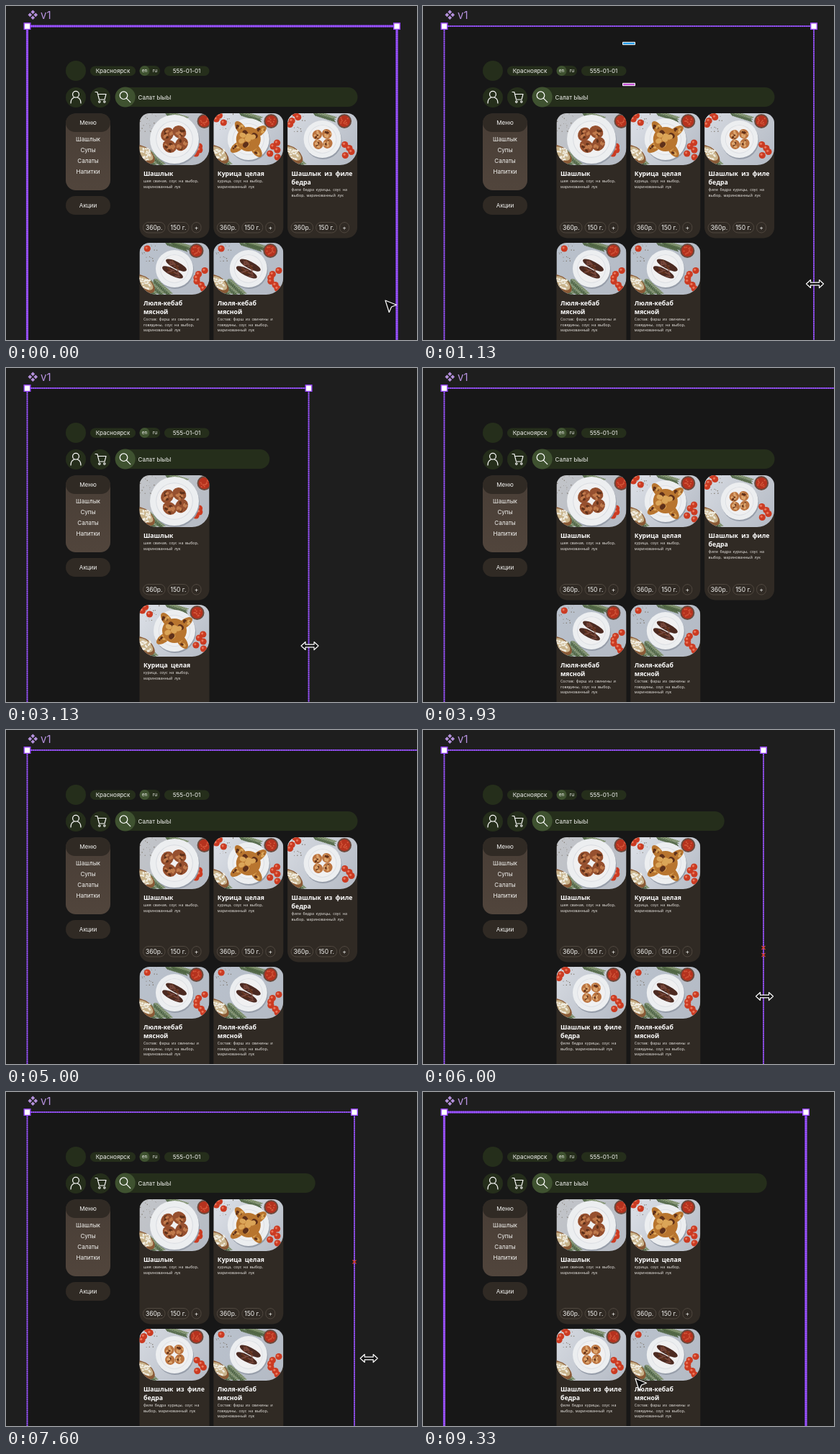
An HTML page with a canvas that plays this animation: 571x464 px, repeating every 9.6 s.

```html
<!DOCTYPE html>
<html lang="ru">
<head>
<meta charset="utf-8">
<title>Responsive menu</title>
<style>
  html, body { margin: 0; height: 100%; overflow: hidden; background: #1e1e1e; }
  canvas { display: block; width: 571px; height: 464px; }
</style>
</head>
<body>
<canvas id="stage"></canvas>
<script>
const W = 571, H = 464, LOOP = 9600, STEP = 1000 / 15;
const canvas = document.getElementById('stage');
const dpr = window.devicePixelRatio || 1;
canvas.width = W * dpr;
canvas.height = H * dpr;
const c = canvas.getContext('2d');

const UI = 'Inter, sans-serif', BODY = '"Noto Sans", sans-serif';
const GREEN = '#252e1b', LIME = '#3f5230', BROWN = '#302a24', PURPLE = '#9747ff';
const LEFT = 29.5, TOP = 28, FULL = 543, STICKY = 484;

// Each drag of the right edge: start, end, x it reaches
const DRAGS = [[1400, 2200, 463], [2400, 3330, 415], [3400, 4130, 640], [5000, 6000, 473],
  [6000, 6330, 442], [6470, 6730, 430], [6870, 8000, 532]];

const mix = (a, b, u) => a + (b - a) * u;
function ease(t, start, end) {
  const u = Math.min(1, Math.max(0, (t - start) / (end - start)));
  return u * u * (3 - 2 * u);
}
const dragX = t => DRAGS.reduce((x, [start, end, to]) => mix(x, to, ease(t, start, end)), FULL);

let seed = 1;
const rand = (a = 0, b = 1) => mix(a, b, (seed = seed * 16807 % 2147483647) / 2147483647);
const repeat = (n, draw) => { for (let i = 0; i < n; i++) draw(i); };

function box(x, y, w, h, r, fill, stroke, width = 1) {
  c.beginPath();
  c.roundRect(x, y, w, h, r);
  if (fill) { c.fillStyle = fill; c.fill(); }
  if (stroke) { c.strokeStyle = stroke; c.lineWidth = width; c.stroke(); }
}

function oval(x, y, rx, ry, fill, turn = 0) {
  c.beginPath();
  c.ellipse(x, y, rx, ry, turn, 0, 7);
  c.fillStyle = fill;
  c.fill();
}
const disc = (x, y, r, fill) => oval(x, y, r, r, fill);

function line(d, stroke, width, fill) {
  const p = new Path2D(d);
  if (fill) { c.fillStyle = fill; c.fill(p); }
  c.strokeStyle = stroke;
  c.lineWidth = width;
  c.stroke(p);
}

function text(s, x, y, size, { font = UI, weight = 400, color = '#f4f4f2', align = 'left', gap = 0 } = {}) {
  c.font = `${weight} ${size}px ${font}`;
  c.fillStyle = color;
  c.textAlign = align;
  c.wordSpacing = gap + 'px';
  c.fillText(s, x, y);
}
const centered = (s, x, y, size = 8.1) => text(s, x, y, size, { align: 'center' });

// Pieces sit on a ring: `along` and `across` are their radii, `core` fills the middle
const DISHES = {
  skewer: { plate: 34, bowl: 90, left: 0, right: 3, herbs: 3, light: '#c3c5c9',
    count: 4, ring: 12, along: 10, across: 8.5, start: .6, core: 0, meat: '#96502f', glaze: '#c07a4c' },
  chicken: { plate: 29, bowl: 80, left: 3, right: 5, herbs: 2, light: '#dde1e8',
    count: 4, ring: 18, along: 6, across: 12, start: .95, core: 17, meat: '#b8752f', glaze: '#dba558' },
  fillet: { plate: 26, bowl: 79, left: 4, right: 4, herbs: 2, light: '#d6dae1',
    count: 4, ring: 9.5, along: 7, across: 6.5, start: .7, core: 0, meat: '#bb7440', glaze: '#dda770' },
  kebab: { plate: 26, bowl: 79, left: 1, right: 6, herbs: 5, light: '#bac2cd',
    count: 2, ring: 5.5, along: 16, across: 5, start: -1.1, core: 0, meat: '#4b2a21', glaze: '#75463a' }
};

function herb(x, y, turn) {
  c.save();
  c.translate(x, y);
  c.rotate(turn);
  line('M-15 0H15', '#526b42', 1);
  for (let i = -14; i < 15; i += 2.5) {
    oval(i, -2, 3.2, .8, '#7b8d68', -.6);
    oval(i, 2, 3.2, .8, '#4d6340', .6);
  }
  c.restore();
}

function tomatoes(n, x, y) {
  repeat(n, i => {
    const tx = x + rand(-7, 7), ty = y + (i - (n - 1) / 2) * 5;
    disc(tx, ty, 4.6, '#cb3b22');
    disc(tx - 1.2, ty - 1.2, 1.6, '#ea765a');
  });
}

function bread(x, y) {
  oval(x, y, 17, 9, '#8a5a36', .7);
  oval(x + 1, y - 1, 13, 6.5, '#c9b48c', .7);
  repeat(30, () => disc(x + rand(-8, 8), y + rand(-8, 8), 1.3, '#f0ece0'));
}

function piece(x, y, along, across, turn, { meat, glaze }) {
  c.save();
  c.translate(x, y);
  c.rotate(turn);
  oval(0, 0, along, across, meat);
  repeat(9, i => oval(rand(-.6, .6) * along, rand(-.6, .6) * across,
    along * .26, across * .2, i % 3 ? glaze : '#5f3019', rand(-1, 1)));
  c.restore();
}

function photo(dish) {
  seed = dish.plate * 977 + dish.bowl;
  const x = 48.5, y = 36;
  c.save();
  c.beginPath();
  c.roundRect(0, 0, 97, 72, [14, 14, 24, 24]);
  c.clip();
  const g = c.createLinearGradient(0, 0, 97, 72);
  g.addColorStop(0, dish.light);
  g.addColorStop(1, '#b4bac4');
  c.fillStyle = g;
  c.fillRect(0, 0, 97, 72);

  repeat(dish.herbs, i => i % 2 ? herb(48 + i * 4, 4, .3) : herb(12 + i * 5, 62, .75));
  bread(7, 57);
  repeat(25, () => disc(rand(0, 30), rand(0, 26), rand(.3, .8), '#7d756b'));
  tomatoes(dish.left, 9, 8);
  tomatoes(dish.right, 85, 51);
  disc(dish.bowl, 11, 10, '#6b4a3e');
  disc(dish.bowl, 11, 8, '#b5321e');
  repeat(12, () => disc(dish.bowl + rand(-5, 5), 11 + rand(-5, 5), 1, '#d3573a'));

  disc(x + 1, y + 2, dish.plate, '#979eaa');
  disc(x, y, dish.plate, '#eceef0');
  disc(x, y, dish.plate * .76, '#d9dce1');
  disc(x, y, dish.plate * .73, '#f0f0f1');
  repeat(dish.count, i => {
    const a = dish.start + i / dish.count * 2 * Math.PI;
    piece(x + dish.ring * Math.cos(a), y + dish.ring * Math.sin(a),
      dish.along, dish.across, a + Math.PI / 2, dish);
  });
  if (dish.core) piece(x, y, dish.core, dish.core, 0, dish);
  c.restore();
}

const KEBAB = ['kebab', ['Люля-кебаб', 'мясной'],
  ['Состав: фарш из свинины и', 'говядины, соус на выбор,', 'маринованный лук']];
const CARDS = [
  ['skewer', ['Шашлык'], ['шея свиная, соус на выбор,', 'маринованный лук']],
  ['chicken', ['Курица целая'], ['курица, соус на выбор,', 'маринованный лук']],
  ['fillet', ['Шашлык из филе', 'бедра'], ['филе бедра курицы, соус на', 'выбор, маринованный лук']],
  KEBAB, KEBAB
];

function card([dish, title, info], x, y) {
  c.save();
  c.translate(x, y);
  box(0, 0, 97, 173.5, 15, BROWN);
  photo(DISHES[dish]);
  title.forEach((s, i) => text(s, 5.5, 86.7 + i * 12, 8.7, { font: BODY, weight: 700, gap: 1.9, color: '#fff' }));
  const infoY = 84.2 + title.length * 12;
  info.forEach((s, i) => text(s, 5.5, infoY + i * 7.5, 5.3, { font: BODY, gap: 1.2, color: '#e2dfdb' }));
  [['360р.', 5, 30.5], ['150 г.', 39.5, 29], ['+', 72.5, 13]].forEach(([s, px, w]) => {
    box(px, 151.5, w, 14.5, 7, null, '#574f46', .8);
    centered(s, px + w / 2, 161.8, 8.5);
  });
  c.restore();
}

function header(right) {
  disc(97, 90, 14, GREEN);
  box(117, 83.5, 63, 13.5, 7, GREEN);
  centered('Красноярск', 148.5, 93.2);
  box(185.5, 83, 28.5, 14, 7, GREEN);
  disc(192.5, 90, 7, LIME);
  centered('en', 192.5, 92.4, 6.6);
  centered('ru', 207, 92.4, 6.6);
  box(220, 83.5, 62.5, 13.5, 7, GREEN);
  centered('555-01-01', 251, 93.2);

  disc(97, 127, 14, GREEN);
  c.lineCap = c.lineJoin = 'round';
  line('M101.4 122.8a4.4 4.4 0 1 1-8.8 0a4.4 4.4 0 1 1 8.8 0M90 135c0-5 2-7 4.5-7.8M104 135c0-5-2-7-4.5-7.8', '#fff', 1.2);
  disc(131, 127, 14, GREEN);
  line('M124 119.5h2.8l2.7 10.5h7.5l2-7.5h-11.4M131 133a1.2 1.2 0 1 1-2.4 0a1.2 1.2 0 1 1 2.4 0M138 133a1.2 1.2 0 1 1-2.4 0a1.2 1.2 0 1 1 2.4 0', '#fff', 1.1);
  box(151.5, 113, right - 151.5, 27, 13.5, GREEN);
  disc(165.7, 126.5, 14, LIME);
  line('M168.8 124.2a5.3 5.3 0 1 1-10.6 0a5.3 5.3 0 1 1 10.6 0M167.3 128.2l5.5 5.5', '#fff', 1.2);
  text('Салат ЫыЫ', 183.5, 129.6, 8.1);
}

function sidebar() {
  const g = c.createLinearGradient(0, 170, 0, 256);
  g.addColorStop(0, '#4a3f37');
  g.addColorStop(1, '#51453c');
  box(83, 149.5, 62, 106.5, 14, g);
  box(83, 149.5, 62, 25.5, 13, BROWN);
  centered('Меню', 114, 165);
  ['Шашлык', 'Супы', 'Салаты', 'Напитки'].forEach((s, i) => centered(s, 114, 187.5 + i * 15));
  box(83, 264, 62, 26, 13, BROWN);
  centered('Акции', 114, 280);
}

function selection(edge, thick) {
  c.lineCap = 'butt';
  c.lineJoin = 'miter';
  const outline = `M${LEFT} ${H}V${TOP}H${edge}V${H}`;
  line(outline, thick ? '#8a45ee' : '#7540c8', thick ? 3.2 : 1.8);
  c.setLineDash([1.5, 1.5]);
  line(outline, '#a15bff', thick ? 2.4 : 1.6);
  c.setLineDash([]);
  [LEFT, edge].forEach(x => box(x - 4.3, TOP - 4.2, 8.6, 8.6, 0, '#fff', PURPLE, 1.4));
}

function label() {
  repeat(4, i => {
    c.save();
    c.translate(37.3, 12.3);
    c.rotate(Math.PI / 4 + i * Math.PI / 2);
    box(.8, .8, 4, 4, 0, '#b591dd');
    c.restore();
  });
  text('v1', 48, 17.5, 15, { color: '#b591dd' });
}

function cursor(t, grip) {
  const arriving = t < 260, leaving = t > 8150;
  const rest = t > 5000 ? 370 : 386;
  let x = grip + 1.5, y = rest;
  if (t < 1070) {
    const u = ease(t, 0, 330);
    x = mix(527, 535, u);
    y = mix(409, 394, u);
  } else if (leaving) {
    const u = ease(t, 8130, 8470);
    x = mix(x, 295, u);
    y = mix(rest, 398, u);
  }
  c.save();
  c.translate(x, y);
  c.lineJoin = 'round';
  if (arriving || leaving) line('M0 0L15.5 6.3L8.5 9L5.3 16.5Z', '#fff', 1.2, '#0c0c0c');
  else line('M-12 0L-6 -5.5V-1.8H6V-5.5L12 0L6 5.5V1.8H-6V5.5Z', '#fff', 1.2, '#111');
  c.restore();
}

function draw(t) {
  const grip = dragX(t);
  const stuck = t > 6870 && grip > STICKY && grip < STICKY + 24;
  const edge = stuck ? STICKY : grip;
  const right = Math.min(edge - 54.3, 488.5);
  const columns = edge >= 542 ? 3 : edge >= 439 ? 2 : 1;
  c.setTransform(dpr, 0, 0, dpr, 0, 0);
  c.fillStyle = '#1e1e1e';
  c.fillRect(0, 0, W, H);
  c.fillStyle = '#171717';
  c.fillRect(LEFT, TOP, edge - LEFT, H);

  header(right);
  sidebar();
  CARDS.forEach((item, i) => card(item, 185.5 + i % columns * 102.8, 149 + Math.floor(i / columns) * 180));
  label();
  const hovered = t < 900 || (t > 8190 && t < 8990) || t > 9320;
  selection(edge, hovered);

  if (t > 190 && t < 1390) {
    box(277.5, 50.3, 17, 3.4, 0, '#229bea', '#fff');
    box(277.5, 107.3, 17, 3.4, 0, '#c651d8', '#fff');
  }
  const snaps = stuck ? [236] : Math.abs(t - 6000) < 40 ? [302.5, 312.5] : [];
  snaps.forEach(y => line(`M${edge - 2.5} ${y - 2.5}l5 5m0 -5l-5 5`, '#e2402c', 1.1));
  cursor(t, grip);
}

// The picture advances 15 times a second; a small lead absorbs timer rounding
const begin = performance.now();
function tick() {
  const t = (performance.now() - begin) % LOOP;
  draw(Math.floor((t + 6) / STEP) * STEP % LOOP);
  requestAnimationFrame(tick);
}
tick();
</script>
</body>
</html>
```
